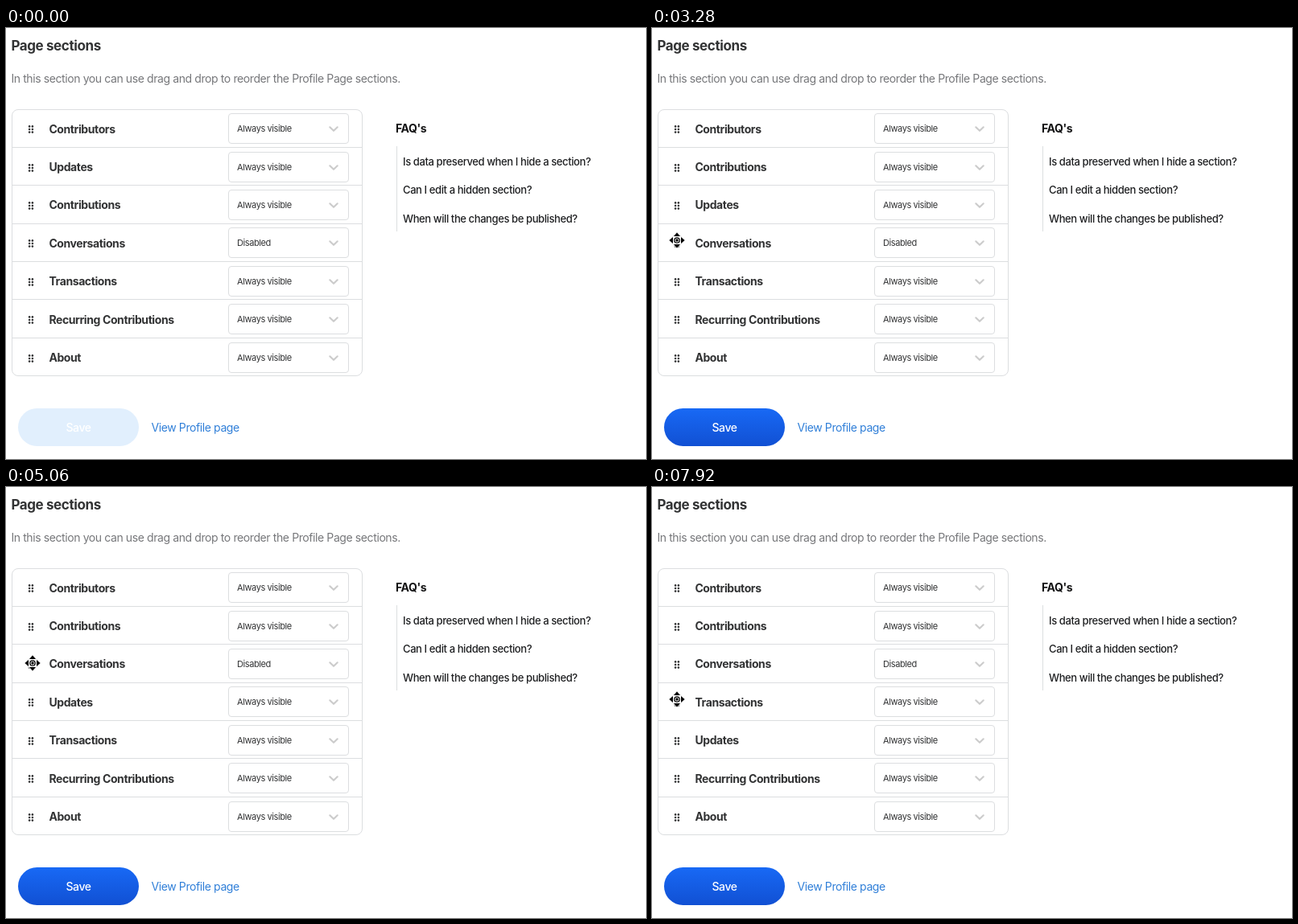
An HTML page for the animation above (9.06 s loop, 795x536 px).

```html
<!DOCTYPE html>
<html lang="en">
<head>
<meta charset="utf-8">
<title>Page sections</title>
<style>
html, body { margin: 0; width: 100%; height: 100%; overflow: hidden; background: #fff; }
body { position: relative; font: 14px/20px Inter, "Liberation Sans", sans-serif; letter-spacing: -.4px; color: #323334; font-optical-sizing: none; cursor: default; }
body *, .abs { position: absolute; box-sizing: border-box; white-space: nowrap; }
svg * { position: static; }
.panel { left: 7px; top: 101px; width: 436px; height: 332px; border: 1px solid #dcdee0; border-radius: 8px; }
.line { left: 8px; width: 434px; height: 1px; background: #dcdee0; }
.slot { left: 8px; width: 434px; height: 46.4px; background: #ebf4fd; }
.row { left: 0; width: 442px; height: 47px; }
.row b { left: 53.4px; top: 14.9px; }
.row svg { overflow: visible; }
.grip { left: 31px; top: 25.4px; width: 1px; height: 1px; }
.select { left: 276px; top: 5.4px; width: 150px; height: 38px; border: 1px solid #dcdee0; border-radius: 4px; background: #fff; font-size: 11px; }
.select span { left: 10px; top: 8px; }
.select svg { left: 120px; top: 8px; }
.faq { left: 493px; font-size: 13px; font-weight: 500; color: #1f2022; }
.save { left: 15px; top: 473px; width: 150px; height: 47px; border-radius: 24px; background: #e1effd; color: #fff; font-weight: 500; line-height: 47px; text-align: center; }
.save.on { background: linear-gradient(#1869f5, #1150d3); }
#cursor { z-index: 3; width: 1px; height: 1px; overflow: visible; }
</style>
</head>
<body>
<b style="left:6.4px;top:11.500px;font-size:17px">Page sections</b>
<span style="left:6.4px;top:52.500px;color:#76777a">In this section you can use drag and drop to reorder the Profile Page sections.</span>
<div class="panel"></div>
<div class="slot" id="slot"></div>
<div id="list"></div>
<b style="left:484px;top:115px;color:#141415">FAQ's</b>
<div style="left:485px;top:147px;width:1px;height:106px;background:#dcdee0"></div>
<span class="faq" style="top:155.500px">Is data preserved when I hide a section?</span>
<span class="faq" style="top:190.500px">Can I edit a hidden section?</span>
<span class="faq" style="top:226.500px">When will the changes be published?</span>
<div class="save" id="save">Save</div>
<span style="left:180.500px;top:487px;color:#307fd8">View Profile page</span>
<svg id="cursor">
  <g id="arrow">
    <path d="M0 0V15l3.500-3 2.500 5.500 2.500-1-2.500-5.500h4.500z" stroke="#fff"/>
  </g>
  <g id="move">
    <path d="M0-10 10 0 0 10-10 0z" fill="#fff" stroke="#ccc" stroke-width=".5"/>
    <path d="M0-9.500 4-5h-8zM0 9.500 4 5h-8zM-9.500 0-5-4v8zM9.500 0 5-4v8z"/>
    <circle r="3.200" fill="#fff" stroke="#000" stroke-width="1.300"/>
    <circle r="1.700"/>
  </g>
  <g id="hand">
    <path d="M-7 1q0-2.500 3-1v-4q1-2 2.500-.5 1.300-1.500 2.600 0 1.500-1 2.500.5 2.400-.5 2.400 1.500V2q0 2-1.500 3.500v1.500H-3.500V5z" stroke="#fff" stroke-width="2"/>
    <path d="M-7 1q0-2.500 3-1v-4q1-2 2.500-.5 1.300-1.500 2.600 0 1.500-1 2.500.5 2.400-.5 2.400 1.500V2q0 2-1.500 3.500v1.500H-3.500V5z"/>
  </g>
  <path id="badge" d="M2.500 5h7l-1.500 2.200 3.500 3.300-2.500 2.500-3.500-3.500-3 2z" fill="#fff" stroke="#000" stroke-width="1.200"/>
</svg>
<script>
const LOOP = 9060, TOP = 100.8, PITCH = 47.4;
const $ = id => document.getElementById(id);
const names = ["Contributors", "Updates", "Contributions", "Conversations", "Transactions", "Recurring Contributions", "About"];

// time, x, y of the pointer
const path = [
  [530, 343, 20], [1390, 34, 178], [1539, 34, 178], [1540, 29, 175], [1720, 28, 176],
  [1820, 28, 176], [1900, 27, 184], [2590, 22, 231], [2679, 22, 231], [2680, 24, 226],
  [3080, 24, 226], [3280, 31, 264], [3380, 31, 264], [3470, 31, 289], [3670, 31, 289],
  [3870, 31, 268], [4070, 28, 270], [4200, 28, 262], [4430, 28, 233], [4840, 28, 219],
  [4989, 28, 219], [4990, 33, 219], [5279, 33, 219], [5280, 32, 210], [5440, 32, 210],
  [5740, 38, 347], [5960, 38, 347], [6160, 28, 320], [6260, 28, 320], [6400, 28, 318],
  [6880, 29, 283], [7300, 28, 267], [7449, 28, 267], [7450, 31, 263], [7820, 31, 263], [7920, 31, 264]
];
const drags = [
  { press: 1720, start: 1850, swap: 2190, drop: 2680, row: 1, from: 1, to: 2 },
  { press: 4070, start: 4150, swap: 4400, drop: 4990, row: 3, from: 3, to: 2 },
  { press: 6290, start: 6380, swap: 6900, drop: 7450, row: 4, from: 4, to: 3 }
];

const dots = [-1.9, 1.9].flatMap(x => [-3.6, 0, 3.6].map(y => `<circle cx="${x}" cy="${y}" r="1.3" fill="#323334"/>`)).join("");
const rows = names.map((name, i) => {
  const row = document.createElement("div");
  row.className = "row";
  row.innerHTML = `<svg class="grip">${dots}</svg><b>${name}</b>
    <div class="select"><span>${i === 3 ? "Disabled" : "Always visible"}</span>
    <svg width="20" height="20"><path d="M5.300 8.300 10 12.800 14.700 8.300" fill="none" stroke="#ccc" stroke-width="2.200" stroke-linecap="round" stroke-linejoin="round"/></svg></div>`;
  if (i) $("list").insertAdjacentHTML("beforeend", `<div class="line" style="top:${Math.floor(TOP + PITCH * i)}px"></div>`);
  $("list").append(row);
  return row;
});

function pointer(t) {
  const k = path.findIndex(p => p[0] > t);
  if (k < 0) return path[path.length - 1].slice(1);
  const [t0, x0, y0] = path[k - 1], [t1, x1, y1] = path[k];
  const u = (t - t0) / (t1 - t0), e = u * u * (3 - 2 * u);
  return [Math.round(x0 + (x1 - x0) * e), Math.round(y0 + (y1 - y0) * e)];
}

const show = (el, on) => el.style.display = on ? "" : "none";

function draw(t) {
  const order = names.map((_, i) => i);
  for (const d of drags) if (t >= d.swap) order.splice(d.to, 0, order.splice(d.from, 1)[0]);
  const held = drags.find(d => t >= d.press && t < d.drop);
  const drag = held && t >= held.start ? held : null;
  const visible = t >= 530;
  const [x, y] = visible ? pointer(t) : [0, 0];

  rows.forEach((row, i) => {
    const lifted = drag && drag.row === i, s = row.style;
    const top = TOP + PITCH * order.indexOf(i);
    s.left = (lifted ? x - 48 : 0) + "px";
    s.top = (lifted ? y - 37.9 : top) + "px";
    s.opacity = lifted ? .5 : 1;
    s.zIndex = lifted ? 2 : 1;
    if (lifted) $("slot").style.top = top + .6 + "px";
  });
  show($("slot"), drag);
  $("save").classList.toggle("on", t >= drags[0].drop);

  show($("cursor"), visible);
  $("cursor").style.left = x + "px";
  $("cursor").style.top = y + "px";
  show($("arrow"), t < 1330);
  show($("move"), t >= 1330 && !held);
  show($("hand"), held);
  show($("badge"), drag);
  $("hand").setAttribute("transform", drag ? "scale(.75)" : "scale(1)");
}

function frame() {
  draw(performance.now() % LOOP);
  requestAnimationFrame(frame);
}
frame();
</script>
</body>
</html>
```
